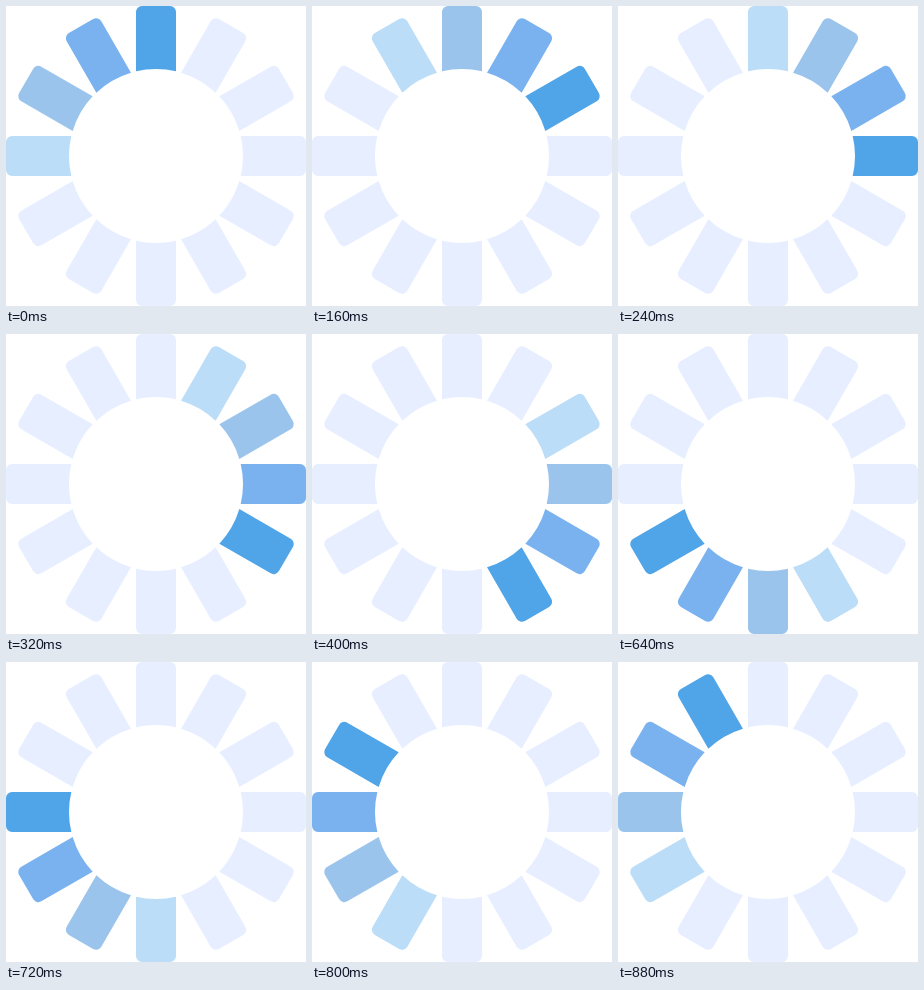
These frames come from a looping animation (300 px wide and 300 px high, 0.96 s). An HTML page:

```html
<!DOCTYPE html>
<html lang="en">
<head>
<meta charset="utf-8">
<title>Spinner</title>
<style>
  html, body { margin: 0; width: 100%; height: 100%; overflow: hidden; background: #fff; }
  svg { display: block; width: 100%; height: 100%; }
  .bar {
    transform: rotate(calc(var(--i) * 30deg));
    /* the extra 0.1ms keeps step edges clear of rounding */
    animation: trail 960ms step-end calc((var(--i) - 12) * 80ms - 0.1ms) infinite;
  }
  @keyframes trail {
    0%       { fill: #50a4e8; }
    8.3333%  { fill: #7ab2f0; }
    16.6666% { fill: #9bc4ed; }
    25%      { fill: #bbddf8; }
    33.3333%, 100% { fill: #e6eeff; }
  }
</style>
</head>
<body>
<svg viewBox="-150 -150 300 300"></svg>
<script>
  const svg = document.querySelector('svg');
  // Rounded outer corners, inner edge follows a circle of radius 87
  const shape = 'M-20-84.67V-144a6 6 0 0 1 6-6H14a6 6 0 0 1 6 6V-84.67A87 87 0 0 0-20-84.67Z';

  for (let i = 0; i < 12; i++) {
    const bar = document.createElementNS(svg.namespaceURI, 'path');
    bar.setAttribute('class', 'bar');
    bar.setAttribute('d', shape);
    bar.style.setProperty('--i', i);
    svg.append(bar);
  }
</script>
</body>
</html>
```
